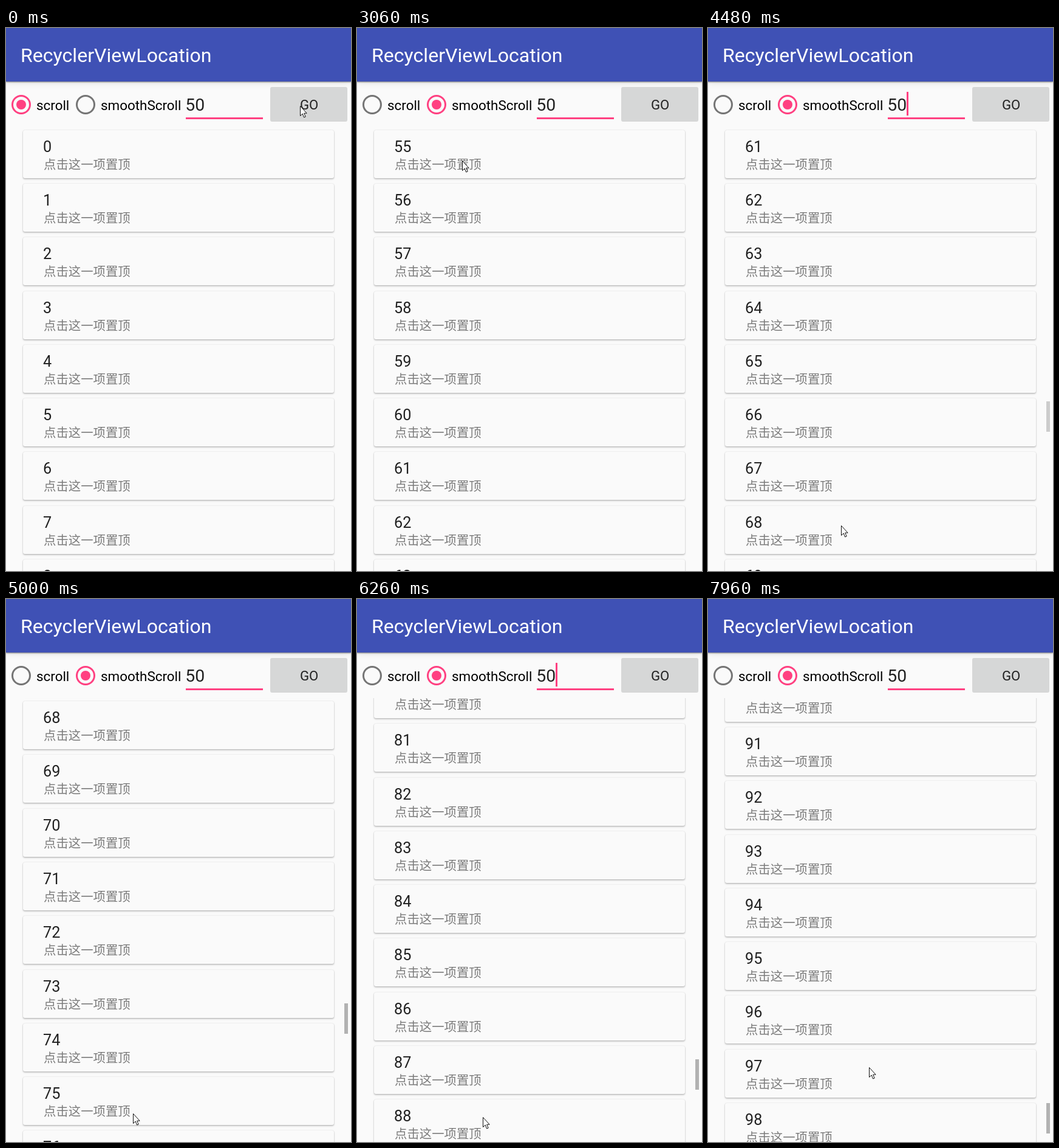
These frames come from a looping animation (568x893 px, 8 s). An HTML page:

```html
<!DOCTYPE html>
<html lang="zh-CN">
<head>
<meta charset="utf-8">
<title>RecyclerViewLocation</title>
<style>
  html, body { margin: 0; width: 100%; height: 100%; overflow: hidden; background: #fafafa; }
  #stage { position: relative; width: 568px; height: 893px; overflow: hidden; background: #fafafa;
    font-family: Roboto, "Noto Sans CJK SC", "Noto Sans CJK", sans-serif; }
  #stage * { position: absolute; white-space: nowrap; }
  .bar { left: 0; top: 0; width: 568px; height: 88px; background: #3f51b5;
    box-shadow: 0 1px 2px rgba(0,0,0,.5), 0 2px 11px rgba(0,0,0,.1); }
  .text { line-height: 40px; }
  .title { left: 24px; top: 25px; font-size: 32.1px; color: #fff; }
  .label { top: 106.5px; font-size: 22.4px; color: #000; }
  .value { left: 295.3px; top: 106.5px; font-size: 28.4px; color: #212121; }
  .line { left: 296px; top: 147px; width: 127px; height: 3px; background: #ff4081; }
  #caret { left: 327px; top: 105px; width: 3px; height: 39px; background: #ff4081; }
  #go { left: 435px; top: 97px; width: 127px; height: 57px; line-height: 59px; border-radius: 3px;
    text-align: center; text-indent: 1px; font-size: 22.1px; color: #212121; }
  .radio { top: 109.5px; width: 26px; height: 26px; border: 3px solid; border-radius: 50%; }
  .radio i { left: 5px; top: 5px; width: 16px; height: 16px; border-radius: 50%; background: #ff4081; }
  #list { left: 0; top: 163px; width: 568px; height: 730px; overflow: hidden; }
  .card { left: 28px; top: 0; width: 512px; height: 79px; border-radius: 3px; background: #fafafa;
    box-shadow: 0 1.5px 2.5px rgba(0,0,0,.26), 0 0 1.5px rgba(0,0,0,.14); }
  .card b { left: 33px; top: 8px; font: 25.24px/40px Roboto, sans-serif; color: #212121; }
  .card span { left: 34px; top: 37px; font-size: 20.4px; line-height: 40px; color: #7c7c7c; }
  #thumb { left: 557px; top: 0; width: 6px; height: 50px; background: #b2b2b2; }
  #pointer { left: 0; top: 0; width: 14px; height: 22px; overflow: visible; }
</style>
</head>
<body>
<div id="stage">
  <div id="list"></div>
  <div class="bar"></div>
  <div class="text title">RecyclerViewLocation</div>
  <div class="radio" style="left:9px"><i></i></div>
  <div class="text label" style="left:50px">scroll</div>
  <div class="radio" style="left:115px"><i></i></div>
  <div class="text label" style="left:156px">smoothScroll</div>
  <div class="text value">50</div>
  <div class="line"></div>
  <div id="caret"></div>
  <div id="go">GO</div>
  <div id="thumb"></div>
  <svg id="pointer"><path d="M.5 .5V16.5L4.2 13L6.6 19L9.2 18L6.7 12.2H11.2Z" fill="#fff" stroke="#111" stroke-width="1"/></svg>
</div>
<script>
const LOOP = 8000, PITCH = 88.28, VIEW_TOP = 163, VIEW = 730, FIRST_TOP = 4.7, COUNT = 100;
const GO_PRESS = 190, GO_RELEASE = 355, GO_ROW = 50, RADIO_PRESS = 2810;

// Where the pointer goes, when it leaves for there, and when it taps the row it rests on.
const home = { x: 484, y: 128 };
const stops = [
  { x: 283, y: 660, leave: 670, travel: 600, taps: [1800] },
  { x: 166, y: 133, leave: 2010, travel: 700, taps: [] },
  { x: 216, y: 747, leave: 3043, travel: 370, taps: [3640] },
  { x: 219, y: 818, leave: 4200, travel: 230, taps: [4580] },
  { x: 207, y: 852, leave: 4860, travel: 320, taps: [5371, 6110] },
  { x: 308, y: 412, leave: 6600, travel: 410, taps: [] },
  { x: 303, y: 450, leave: 7030, travel: 70, taps: [7120] },
  { x: 265, y: 770, leave: 7400, travel: 300, taps: [7757] }
];

const find = id => document.getElementById(id);
const clamp = v => Math.max(0, Math.min(1, v));
const mix = (a, b, p) => a + (b - a) * p;
const easeOut = (p, power) => 1 - (1 - clamp(p)) ** power;
const move = (el, x, y) => { el.style.transform = `translate(${Math.round(x)}px,${Math.round(y)}px)`; };

const list = find('list'), caret = find('caret'), go = find('go');
const thumb = find('thumb'), pointer = find('pointer');
const radios = [...document.querySelectorAll('.radio')];

// Each tap brings the tapped row to the top, at once or smoothly.
const scrolls = [{ start: GO_RELEASE, from: 0, to: GO_ROW, duration: 0 }];
for (const { y, taps } of stops) {
  for (const start of taps) {
    const from = scrolls.at(-1).to;
    const rows = Math.floor((y - VIEW_TOP - FIRST_TOP) / PITCH);
    const duration = start > RADIO_PRESS ? (rows * PITCH / VIEW + 1) * 300 : 0;
    scrolls.push({ start, from, to: from + rows, duration });
  }
}

const cards = Array.from({ length: 10 }, () => {
  const el = document.createElement('div');
  el.className = 'card';
  el.innerHTML = '<b></b><span>点击这一项置顶</span>';
  list.append(el);
  return { el, label: el.firstChild };
});

function scrollState(t) {
  const s = scrolls.findLast(s => t >= s.start);
  if (!s) return { row: 0, alpha: 0 };
  const age = t - s.start;
  const hold = s.duration ? s.duration + 230 : 310;
  const progress = s.duration ? easeOut(age / s.duration, 5) : 1;
  return { row: mix(s.from, s.to, progress), alpha: 1 - clamp((age - hold) / 250) };
}

function pointerAt(t) {
  const i = stops.findLastIndex(s => t >= s.leave);
  if (i < 0) return home;
  const from = stops[i - 1] || home, to = stops[i];
  const p = easeOut((t - to.leave) / to.travel, 3);
  return { x: mix(from.x, to.x, p), y: mix(from.y, to.y, p) };
}

function setRadio(el, amount) {
  el.style.borderColor = amount > .5 ? '#ff4081' : '#757575';
  el.firstChild.style.transform = `scale(${amount})`;
}

function render(t) {
  const { row, alpha } = scrollState(t);
  const first = Math.floor(row);
  cards.forEach(({ el, label }, i) => {
    const n = first + i;
    el.style.display = n < COUNT ? '' : 'none';
    if (label.textContent !== String(n)) label.textContent = n;
    move(el, 0, FIRST_TOP + (n - row) * PITCH);
  });
  thumb.style.opacity = alpha;
  move(thumb, 0, 169.3 + row * 7.29);

  const smooth = clamp((t - RADIO_PRESS) / 60);
  setRadio(radios[0], 1 - smooth);
  setRadio(radios[1], smooth);

  const blink = Math.floor((t - 225) / 493);
  caret.style.opacity = blink >= 0 && blink % 2 === 0 ? 1 : 0;
  go.style.background = t >= GO_PRESS && t < GO_RELEASE ? '#c4c5c5' : '#d6d7d7';
  const { x, y } = pointerAt(t);
  move(pointer, x, y);
}

const begin = performance.now();
function tick() {
  render((performance.now() - begin) % LOOP);
  requestAnimationFrame(tick);
}
tick();
</script>
</body>
</html>
```
